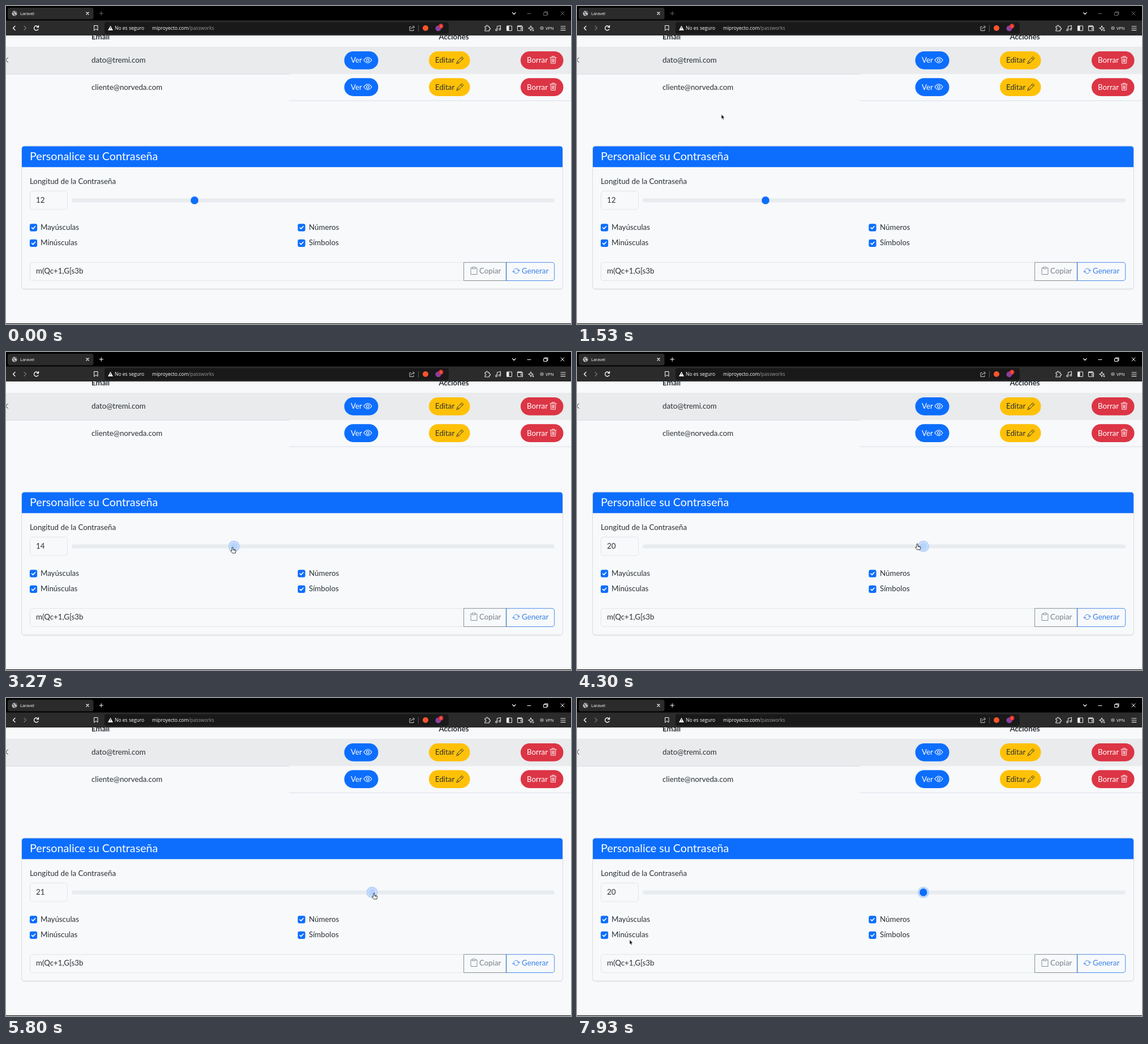
An HTML page that plays this animation: 998 px wide and 561 px high, repeating every 8 s.

```html
<!DOCTYPE html>
<html lang="es">
<head>
<meta charset="utf-8">
<title>Laravel</title>
<style>
  html, body { margin: 0; width: 100%; height: 100%; overflow: hidden; background: #f7f9fb; }
  svg { display: block; width: 100%; height: 100%; }
  text { font: 13.3px Lato, sans-serif; fill: #2c3034; white-space: pre; }
  .bold { font-weight: 700; }
  .title { font-size: 19.7px; fill: #fff; }
  .light text { fill: #fff; }
  .ui text { font: 8.55px "Open Sans", sans-serif; fill: #fff; }
  .ui .small { font-size: 7.5px; }
  .ui .dim { fill: #9c9c9c; }
  .line { fill: none; stroke: currentColor; stroke-linecap: round; stroke-linejoin: round; }
  #controls { color: #6b6b6b; }
  #controls.focused { color: #fff; }
</style>
</head>
<body>
<svg viewBox="0 0 998 561">
  <defs>
    <g id="eye" class="line" stroke-width="1.1">
      <path d="M-7 0Q-3.7-4.8 0-4.8T7 0Q3.7 4.8 0 4.8T-7 0Z"/><circle r="2.3"/>
    </g>
    <g id="pencil" class="line" stroke-width=".9">
      <path d="M-6 6L-4.6 2L3.3-5.9L6-3.2L-2 4.6ZM1.3-3.9L4-1.2M-4.6 2L-2 4.6"/>
    </g>
    <g id="trash" class="line" stroke-width=".9">
      <path d="M-5.4-4.3H5.4M-2-4.5V-6.2H2V-4.5M-4.5-4L-3.8 6.2H3.8L4.5-4M-1.9-1.8L-1.6 4M0-1.8V4M1.9-1.8L1.6 4"/>
    </g>
    <g id="check">
      <rect x="-6.6" y="-6.6" width="13.2" height="13.2" rx="3" fill="#0d6efd"/>
      <path d="M-3 .2L-.9 2.3L3.1-2" class="line" color="#fff" stroke-width="1.6"/>
    </g>
    <g id="actions">
      <g class="light" color="#fff">
        <rect x="597.5" width="60" height="31.7" rx="15.8" fill="#0d6efd"/>
        <text x="609" y="20.3">Ver</text><use href="#eye" x="639" y="15.5"/>
        <rect x="909" width="75.5" height="31.7" rx="15.8" fill="#dc3545"/>
        <text x="920" y="20.3">Borrar</text><use href="#trash" x="966.5" y="15"/>
      </g>
      <g color="#2c3034">
        <rect x="747" width="72.5" height="31.7" rx="15.8" fill="#ffc107"/>
        <text x="758" y="20.3">Editar</text><use href="#pencil" x="802" y="15.5"/>
      </g>
    </g>
  </defs>

  <rect width="998" height="561" fill="#f7f9fb"/>

  <!-- table -->
  <text x="151" y="59" class="bold">Email</text>
  <text x="791" y="59" class="bold" text-anchor="middle">Acciones</text>
  <rect y="72" width="998" height="48" fill="#e9ebed"/>
  <path d="M0 120.4H500M500 167H998" stroke="#d5dae1" stroke-width=".9"/>
  <path d="M3.5 91L-.5 95.3L3.5 99.6" class="line" color="#2c3034"/>
  <text x="151" y="100">dato@tremi.com</text>
  <text x="151" y="147.6">cliente@norveda.com</text>
  <use href="#actions" y="80"/>
  <use href="#actions" y="127.3"/>

  <!-- card -->
  <rect x="27" y="248" width="957" height="253" rx="6" fill="#000" opacity=".05"/>
  <rect x="27.5" y="247" width="956" height="252" rx="5" fill="#f7f9fb" stroke="#d7dade" stroke-width=".9"/>
  <path d="M28 284.3V252Q28 247.4 32.6 247.4H978.4Q983 247.4 983 252V284.3Z" fill="#0d6efd"/>
  <text x="42" y="271.5" class="title">Personalice su Contraseña</text>
  <text x="42" y="313.5">Longitud de la Contraseña</text>
  <g fill="#f7f9fb" stroke="#dfe4ea" stroke-width=".9">
    <rect x="42.3" y="326.4" width="66.2" height="32.6" rx="5"/>
    <path d="M809 452.4H47Q42.3 452.4 42.3 457V480Q42.3 484.4 47 484.4H809"/>
  </g>
  <text id="length" x="53" y="346.8">12</text>
  <rect x="116" y="339.5" width="853" height="7" rx="3.5" fill="#e9ecef"/>
  <g id="thumb">
    <g id="ring"><circle r="10.2" fill="#bad4f8"/><circle r="7.6" fill="#e4edf9"/></g>
    <circle id="knob" r="6.8"/>
  </g>
  <use href="#check" x="48.5" y="390.8"/><text x="61" y="395.3">Mayúsculas</text>
  <use href="#check" x="48.5" y="418.3"/><text x="61" y="422.3">Minúsculas</text>
  <use href="#check" x="522" y="390.8"/><text x="535" y="395.3">Números</text>
  <use href="#check" x="522" y="418.3"/><text x="535" y="422.3">Símbolos</text>
  <text x="53" y="472">m(Qc+1,G[s3b</text>

  <g class="line" color="#7b838a" stroke-width=".9">
    <rect x="809" y="452.3" width="75" height="32.2"/>
    <path d="M823.5 462H821V473.5H832V462H829.5M824 460.5H829V463.5H824Z"/>
  </g>
  <text x="836" y="472" style="fill:#7b838a">Copiar</text>
  <g class="line" color="#3b82e8" stroke-width=".9">
    <path d="M883.7 452.3H964Q968.7 452.3 968.7 457V480Q968.7 484.5 964 484.5H883.7Z"/>
    <path d="M897.3 465.5A4.7 4.7 0 0 1 905.8 466M905.3 469.5A4.7 4.7 0 0 1 896.8 469M904 466H907.5L905.8 468ZM895.1 469H898.6L896.8 467Z"/>
  </g>
  <text x="911" y="472" style="fill:#3b82e8">Generar</text>

  <!-- browser -->
  <g class="ui">
    <rect width="998" height="26" fill="#000"/>
    <rect y="25.5" width="998" height="26.5" fill="#2b2b2b"/>
    <rect x="3" y="3" width="151.5" height="20.5" rx="4" fill="#2b2b2b"/>
    <rect x="174" y="28.5" width="608" height="21" rx="4" fill="#19191a"/>
    <circle cx="15" cy="13" r="4.5" fill="#c4c5c8"/>
    <path d="M11.5 11Q14 10 14 13T17 16M15.5 9L18.5 12" class="line" color="#4b4b50" stroke-width="1.3"/>
    <text x="25" y="15.7" class="small">Laravel</text>
    <g class="line" color="#fff">
      <path d="M142 11L146 15M146 11L142 15M894.5 11.7L897.3 14.5L900.1 11.7" stroke-width="1.2"/>
      <path d="M16 35.5L12.5 39L16 42.5M57 37A4 4 0 1 0 57 41M57.5 34.5V37.5H54.5" stroke-width="1.3"/>
      <path d="M156 34.5H162V43L159 40.5L156 43Z"/>
    </g>
    <path d="M32 35.5L35.5 39L32 42.5" class="line" color="#777" stroke-width="1.2"/>
    <path d="M184.5 34.8L189 43H180Z" fill="#fff"/>
    <path d="M184.5 37.5V40M184.5 41.5V42" stroke="#19191a"/>
    <text x="192" y="42">No es seguro</text>
    <text x="258" y="42">miproyecto.com<tspan class="dim">/passworks</tspan></text>
    <g class="line" color="#c9c9cd">
      <path d="M715 36.5H713V43.5H720V41.5M715.5 40.5Q715.5 37 721 37M719 34.5L721.5 37L719 39.5"/>
      <path d="M728.5 34V45" color="#55555a"/>
    </g>
    <circle cx="741" cy="39" r="5" fill="#fb542b"/>
    <circle cx="763.5" cy="39.5" r="5" fill="#8a3fa0"/>
    <circle cx="768.3" cy="35.5" r="4.2" fill="#e0342c"/>
    <text x="768.3" y="37.7" text-anchor="middle" style="font-size:6px">1</text>

    <g class="line" color="#e4e4e7" stroke-width="1.1">
      <path d="M846 36H848.3Q848 34 849.6 34T851 36H853.5V38.5Q855.5 38.3 855.5 40T853.5 41.5V44H846V41.5Q848 41.5 848 40T846 38.5Z"/>
      <path d="M867.5 42V36L873.5 34.5V40.5"/>
      <circle cx="866.2" cy="42.3" r="1.5"/><circle cx="872.2" cy="41" r="1.5"/>
      <rect x="884.5" y="35" width="9" height="8.5" rx="1"/>
      <path d="M885 35.5H888V43H885Z" fill="#fff"/>
      <path d="M904 36H911V34.8H904.5Q903.5 35 903.5 36V42.5Q903.5 43.5 904.5 43.5H912.5V36.5H904M912.5 38.8H909.5V41.2H912.5"/>
      <path d="M927 35L928.3 38L931.3 39.3L928.3 40.6L927 43.6L925.7 40.6L922.7 39.3L925.7 38ZM931 41.5V44M929.8 42.8H932.2"/>
      <circle cx="946.5" cy="39" r="2.5" color="#a8a8ad"/><path d="M945.5 39H947.5"/>
      <path d="M980 36H988M980 39.3H988M980 42.6H988"/>
    </g>
    <text x="953" y="42" class="small">VPN</text>
    <path id="controls" class="line" d="M165 13H171.5M168.25 9.8V16.2M921 13.5H927M950 11.5H955.5V16.5H950ZM951.5 11V10H957V15H956M980 10L986 16M986 10L980 16"/>
  </g>
  <rect y="560" width="998" height="1" fill="#000"/>

  <!-- pointer, hot spot at 0,0 -->
  <g id="pointer" stroke-linejoin="round">
    <path id="arrow" d="M0 0V8L1.8 6.5L3.1 9.3L4.4 8.7L3.2 6H5.6Z" fill="#111" stroke="#fff" stroke-width=".5"/>
    <path id="hand" d="M-1 .8Q0-.6 1 .8V4.3L5 5Q6 5.4 5.8 6.6L5 10.8H-.3L-3.5 6.8Q-3.3 5.3-1 6.7ZM2.4 4.7V6.5M3.9 5V6.6" fill="#fff" stroke="#222" stroke-width=".9"/>
  </g>
</svg>
<script>
const LOOP = 8000, PRESS = 2700, RELEASE = 6700;
const START = { x: 333, value: 12 }, STEP = 34.85;

// time, x, y of the pointer
const PATH = [
  [1200, 200, 0], [1530, 255, 191], [2300, 330, 344], [2700, 333, 344],
  [3270, 400, 344], [4300, 601, 338], [5000, 640, 341], [5800, 650, 344],
  [6400, 613, 344], [6900, 612, 345], [7500, 250, 400], [7930, 93, 426.5]
];

const el = id => document.getElementById(id);
const show = (id, on) => el(id).style.display = on ? '' : 'none';
const move = (id, x, y) => el(id).setAttribute('transform', `translate(${x} ${y})`);

function pointerAt(t) {
  const i = PATH.findIndex(p => p[0] > t);
  if (i === 0) return PATH[0].slice(1);
  if (i < 0) return PATH[PATH.length - 1].slice(1);
  const [t0, x0, y0] = PATH[i - 1], [t1, x1, y1] = PATH[i];
  const k = (t - t0) / (t1 - t0);
  return [x0 + (x1 - x0) * k, y0 + (y1 - y0) * k];
}

function valueAt(t) {
  if (t < PRESS) return START.value;
  const [x] = pointerAt(Math.min(t, RELEASE));
  return START.value + Math.round((x - START.x) / STEP);
}

function draw(t) {
  const [x, y] = pointerAt(t), value = valueAt(t);
  const focused = t >= PRESS, pressed = focused && t < RELEASE;
  const overSlider = y > 333 && y < 352 && x > 116 && x < 969;
  el('length').textContent = value;
  move('thumb', START.x + (value - START.value) * STEP, 342.9);
  show('ring', focused);
  el('knob').setAttribute('fill', pressed ? '#b6d4fe' : '#0d6efd');
  el('controls').classList.toggle('focused', focused);
  show('pointer', t >= PATH[0][0]);
  show('hand', pressed || overSlider);
  show('arrow', !pressed && !overSlider);
  move('pointer', x, y);
}

const begin = performance.now();
function tick() {
  draw((performance.now() - begin) % LOOP);
  requestAnimationFrame(tick);
}
tick();
</script>
</body>
</html>
```
